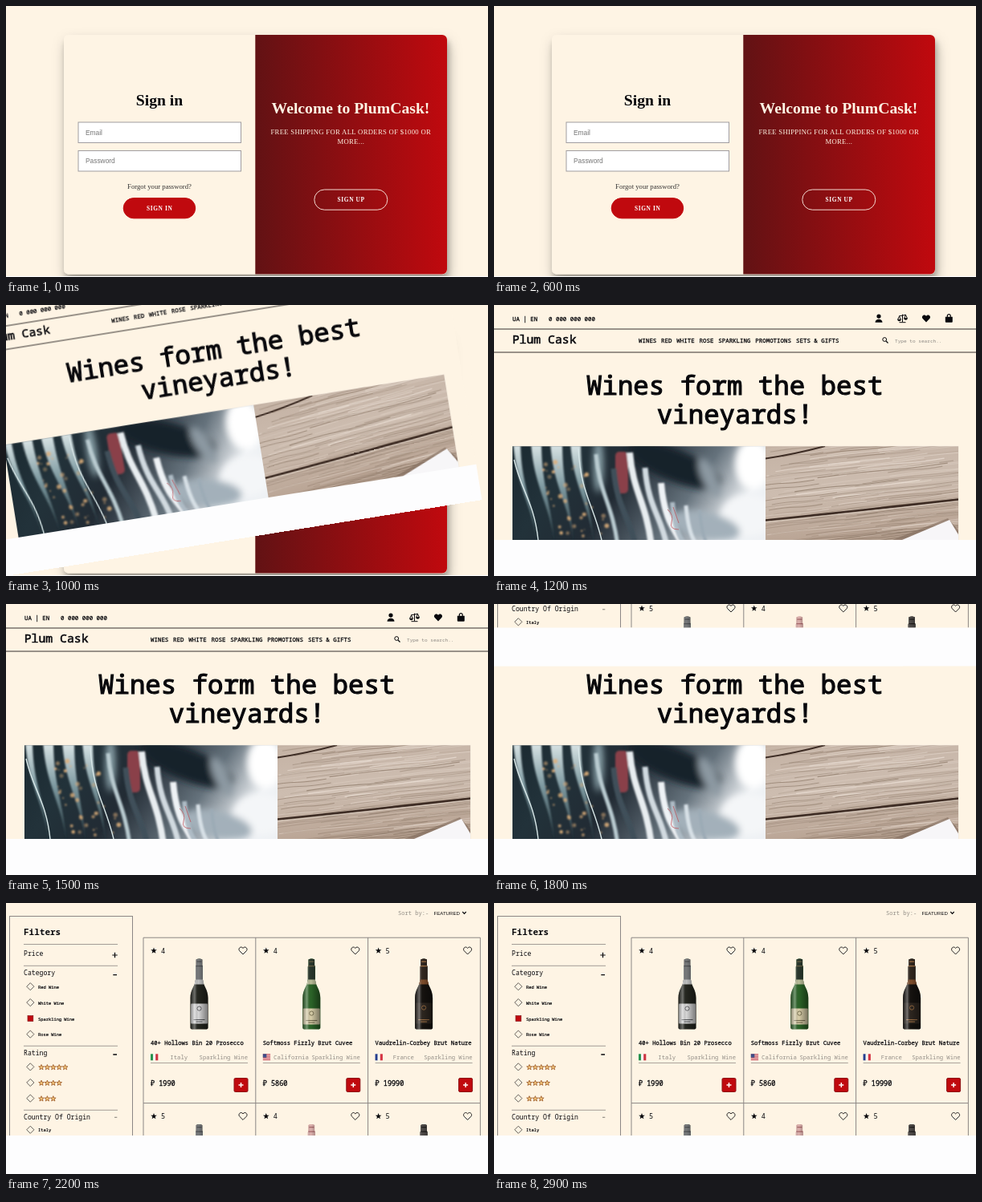
An HTML page for the animation above (3000 ms loop, 600 px wide and 338 px high).

```html
<!DOCTYPE html>
<html lang="en">
<head>
<meta charset="utf-8">
<title>Wine shop</title>
<style>
html, body { margin: 0; width: 100%; height: 100%; overflow: hidden; background: #fef4e4; }
svg { display: block; width: 100vw; height: 100vh; }
text { white-space: pre; }
.mono { font-family: "Noto Sans Mono", "DejaVu Sans Mono", monospace; }
.serif { font-family: "Liberation Serif", serif; }
.sans { font-family: "Liberation Sans", sans-serif; }
#home { transform-origin: 0 338px; animation: swing 3s step-end infinite; }
#shop { animation: drop 3s step-end infinite; }
/* Ease-out cubic, held at ten steps per second */
@keyframes swing {
  0% { transform: rotate(-90deg); }
  26.66% { transform: rotate(-58.6deg); }
  29.99% { transform: rotate(-26.74deg); }
  33.33% { transform: rotate(-9.1deg); }
  36.66% { transform: rotate(-1.7deg); }
  39.99%, 100% { transform: rotate(0deg); }
}
@keyframes drop {
  0% { transform: translateY(-340px); }
  59.99% { transform: translateY(-260.5px); }
  63.33% { transform: translateY(-124px); }
  66.66% { transform: translateY(-46px); }
  69.99% { transform: translateY(-11px); }
  73.33%, 100% { transform: translateY(0); }
}
</style>
</head>
<body>
<svg viewBox="0 0 600 338" preserveAspectRatio="none">
  <defs>
    <linearGradient id="wine"><stop stop-color="#621214"/><stop offset="1" stop-color="#c0090e"/></linearGradient>
    <linearGradient id="cellar" x2="1" y2=".25">
      <stop stop-color="#1b2a31"/><stop offset=".25" stop-color="#22323a"/><stop offset=".5" stop-color="#222b34"/>
      <stop offset=".78" stop-color="#65727c"/><stop offset="1" stop-color="#eef1f4"/>
    </linearGradient>
    <linearGradient id="glare" x2="0" y2="1">
      <stop stop-color="#dfe9ea"/><stop offset=".45" stop-color="#7e9aa1"/><stop offset="1" stop-color="#22343b"/>
    </linearGradient>
    <linearGradient id="wood" x2=".2" y2="1">
      <stop stop-color="#c4b2a4"/><stop offset=".5" stop-color="#cdbdb0"/><stop offset="1" stop-color="#b9a494"/>
    </linearGradient>
    <linearGradient id="glass">
      <stop stop-color="#000" stop-opacity=".4"/><stop offset=".25" stop-color="#fff" stop-opacity=".35"/>
      <stop offset=".45" stop-color="#000" stop-opacity="0"/><stop offset="1" stop-color="#000" stop-opacity=".45"/>
    </linearGradient>
    <filter id="soft"><feGaussianBlur stdDeviation="1.3"/></filter>
    <filter id="softer" x="-50%" y="-50%" width="200%" height="200%"><feGaussianBlur stdDeviation="4"/></filter>
    <filter id="shade" x="-10%" y="-10%" width="120%" height="125%">
      <feDropShadow dy="8" stdDeviation="8" flood-opacity=".25"/>
      <feDropShadow dy="6" stdDeviation="3" flood-opacity=".2"/>
    </filter>
    <clipPath id="cellarBox"><rect x="23" y="176.3" width="315" height="117"/></clipPath>
    <clipPath id="woodBox"><rect x="338" y="176.3" width="240" height="117"/></clipPath>
    <clipPath id="shopBox"><rect width="600" height="290"/></clipPath>
  </defs>
  <g id="login"></g>
  <g id="home"></g>
  <g id="shop"></g>
</svg>
<script>
const CREAM = '#fef4e4', RED = '#c0090e', INK = '#08080c', LINE = '#8b8785', BLANK = '#fdfdfe';

const text = (font, x, y, size, str, attrs = '') =>
  `<text class="${font}" x="${x}" y="${y}" font-size="${size}" ${attrs}>${str}</text>`;
const mono = (...args) => text('mono', ...args);
const serif = (...args) => text('serif', ...args);
// A thin outline gives the weight between regular and bold
const medium = (x, y, size, str, attrs = '') =>
  mono(x, y, size, str, `stroke="${INK}" stroke-width="${(size * .036).toFixed(2)}" ${attrs}`);
const rect = (x, y, w, h, fill, attrs = '') =>
  `<rect x="${x}" y="${y}" width="${w}" height="${h}" fill="${fill}" ${attrs}/>`;
const path = (d, attrs = '') => `<path d="${d}" ${attrs}/>`;
const stroke = (color, width = 1) => `fill="none" stroke="${color}" stroke-width="${width}"`;
const at = (x, y, inner) => `<g transform="translate(${x} ${y})">${inner}</g>`;
const times = (n, fn) => Array.from({ length: n }, (_, i) => fn(i)).join('');
const each = (list, fn) => list.map(fn).join('');
const middle = 'text-anchor="middle"';

function seeded(seed) {
  return () => (seed = (seed * 16807) % 2147483647) / 2147483647;
}

function star(x, y, r, attrs) {
  const points = times(10, i => {
    const a = i * Math.PI / 5, d = i % 2 ? r * .42 : r;
    return `${(x + d * Math.sin(a)).toFixed(2)},${(y - d * Math.cos(a)).toFixed(2)} `;
  });
  return `<polygon points="${points}" ${attrs}/>`;
}

const heart = (x, y, attrs) =>
  at(x, y, path('M0 4.7L-4.3.4C-6.3-2-3.8-5.2-1.2-4L0-2.9 1.2-4C3.8-5.2 6.3-2 4.3.4Z', attrs));

function login() {
  const field = (y, label) => rect(90, y, 202.5, 25.5, '#fff', 'stroke="#a09da0"') +
    text('sans', 99, y + 15.5, 8.4, label, 'fill="#757575"');
  const button = (x, y, w, label, fill, edge) =>
    rect(x, y, w, 25.2, fill, `rx="12.6" stroke="${edge}"`) +
    serif(x + w / 2 + .3, y + 15.2, 7.4, label, `${middle} font-weight="700" letter-spacing=".62" fill="#fff"`);
  const pitch = `${middle} letter-spacing=".31"`;
  return rect(0, 0, 600, 338, CREAM) +
    rect(72, 36, 477, 298.5, CREAM, 'rx="6" filter="url(#shade)"') +
    path('M310.3 36H543a6 6 0 0 1 6 6V328.5a6 6 0 0 1-6 6H310.3Z', 'fill="url(#wine)"') +
    serif(191, 124, 19.7, 'Sign in', `${middle} font-weight="700" fill="${INK}"`) +
    field(145, 'Email') + field(180.5, 'Password') +
    serif(191, 227.7, 8.68, 'Forgot your password?', `${middle} fill="#333"`) +
    button(146.2, 239.6, 89.5, 'SIGN IN', RED, RED) +
    `<g fill="${CREAM}">` +
    serif(429, 134, 19.7, 'Welcome to PlumCask!', `${middle} font-weight="700"`) +
    serif(429.3, 159.8, 8.69, 'FREE SHIPPING FOR ALL ORDERS OF $1000 OR', pitch) +
    serif(429.3, 172.2, 8.69, 'MORE...', pitch) + '</g>' +
    button(383.8, 229, 91, 'SIGN UP', 'none', '#f3d9d0') +
    rect(0, 337, 600, 1, BLANK);
}

function cellarPhoto() {
  const rnd = seeded(41);
  const blob = (x, y, rx, ry, fill, turn = 0) =>
    `<ellipse rx="${rx}" ry="${ry}" fill="${fill}" transform="translate(${x} ${y}) rotate(${turn})"/>`;
  const streak = (x, y, color, width) =>
    path(`M${x} ${y}C${x + 4} ${y + 50} ${x + 20} ${y + 60} ${x + 27} 300`, stroke(color, width));
  // Light between two bottle necks, narrowing towards the shoulders
  const gap = (x, width) =>
    path(`M${x} 170C${x + 3} 225 ${x + 22} 245 ${x + 29} 296C${x + 25} 245 ${x + width} 225 ${x + width} 170Z`, 'fill="url(#glare)"');
  return '<g clip-path="url(#cellarBox)">' + rect(23, 176, 315, 118, 'url(#cellar)') +
    '<g filter="url(#softer)">' +
    blob(225, 200, 62, 20, '#19232b', 22) + blob(268, 215, 9, 26, '#8d9aa3', -25) +
    blob(322, 198, 22, 32, '#fff') + blob(316, 262, 34, 26, '#f4f6f8') +
    blob(262, 275, 45, 17, '#a3b0ba', 12) + blob(130, 200, 6, 34, '#91a9b0') + '</g>' +
    '<g filter="url(#soft)">' + gap(24, 9) + gap(46, 13) + gap(70, 15) + gap(95, 13) +
    rect(151, 183, 16, 52, '#8a4148', 'rx="5"') +
    streak(127, 186, '#b9cbd0', 5) + streak(149, 204, '#3f505a', 7) + streak(169, 184, '#e8edf0', 8) +
    streak(188, 203, '#d1dae0', 7) + streak(208, 222, '#eef2f5', 8) + streak(222, 246, '#aebbc5', 6) +
    streak(239, 250, '#d7e0e6', 5) + streak(256, 256, '#9cabb6', 4) +
    times(38, () => {
      const y = 196 + rnd() * 94, x = 52 + (y - 196) * .35 + rnd() * 62;
      return `<circle cx="${x}" cy="${y}" r="${.8 + rnd() * 2.2}" fill="#dcae79" opacity="${.35 + rnd() * .6}"/>`;
    }) + '</g>' +
    path('M25 193C34 232 50 246 55 293M105 179C108 235 123 247 134 293', stroke('#d8e7e8', 1.4)) +
    path('M216 255q8 7 5 16t9 9M223 252l7 20', stroke('#bd4b52', .7)) + '</g>';
}

function woodPhoto() {
  const rnd = seeded(17), slope = -.115;
  const grain = times(150, () => {
    const x = 320 + rnd() * 180, w = 50 + rnd() * 150, y = 180 + rnd() * 145 + (x - 338) * slope;
    const color = rnd() > .42 ? '#84705f' : '#eee3d9';
    return path(`M${x} ${y}q${w * .3} ${w * .3 * slope - 1.5} ${w * .5} ${w * .5 * slope}t${w * .5} ${w * .5 * slope}`,
      stroke(color, .4 + rnd() * .9) + ` opacity="${.2 + rnd() * .5}"`);
  });
  return '<g clip-path="url(#woodBox)">' + rect(338, 176, 240, 118, 'url(#wood)') + grain +
    path('M338 191.5Q375 186 412 176', stroke('#3d2c24', 2)) +
    path('M338 268.5Q460 256 578 242.5', stroke('#3d2c24', 2.6)) +
    path('M338 270.8Q460 258.3 578 244.8', stroke('#e3d6ca', .9)) +
    path('M496 293L565 266 578 281V293Z', 'fill="#806b5c" opacity=".6"') +
    path('M508 293L567 268 579 288V294H508Z', 'fill="#f7f6f8"') + '</g>';
}

function home() {
  const nav = [[180, 'WINES'], [208, 'RED'], [227.3, 'WHITE'], [255.5, 'ROSE'], [279.3, 'SPARKLING'],
    [325.3, 'PROMOTIONS'], [376, 'SETS &amp; GIFTS']];
  const icons =
    at(479, 16.7, '<circle cy="-2.6" r="2.6"/>' + path('M-4.5 5C-4.5-.3 4.5-.3 4.5 5Z')) +
    at(508.5, 16.7, path('M0-5V4.5M-4 5H4M-4.5-2.8L4.5-4.5M-4-2.5L-6 1.5H-2ZM4-4L2 0H6Z', stroke(INK)) +
      path('M-6.2 1.5a2.2 2 0 0 0 4.4 0ZM1.8 0a2.2 2 0 0 0 4.4 0Z')) +
    heart(538, 16.7, '') +
    at(566.3, 16.7, path('M-4.5-2H4.5V4a1 1 0 0 1-1 1H-3.5a1 1 0 0 1-1-1Z') +
      path('M-2-.5V-3a2 2 0 0 1 4 0V-.5', stroke(INK, 1.2)));
  return rect(0, 0, 600, 338, CREAM) + `<g fill="${INK}">` +
    medium(23, 19.6, 7.44, 'UA | EN') + medium(68, 19.6, 7.44, '0 000 000 000') + icons +
    medium(22.7, 48, 14.8, 'Plum Cask') +
    each(nav, ([x, label]) => medium(x, 47.3, 7.44, label)) +
    path('M0 30H600M0 59H600', stroke('#34302f')) +
    '<circle cx="486.2" cy="43" r="2.4" ' + stroke(INK) + '/>' + path('M488 45L490.5 47.5', stroke(INK, 1.2)) +
    mono(499, 46.5, 6.1, 'Type to search..', 'fill="#8c8883"') +
    medium(299.7, 111.5, 32.4, 'Wines form the best', middle) +
    medium(300, 147.5, 32.4, 'vineyards!', middle) + '</g>' +
    rect(22.4, 175.8, 556.2, 118, '#efe7db') + cellarPhoto() + woodPhoto() +
    rect(0, 293, 600, 45, BLANK);
}

function bottle(x, y, { foil, body, label, collar, top, height, mark }) {
  const shape = 'M-3.8 1Q0-1 3.8 1V8L4.5 10V26C5 34 11 38 11 49V86Q11 88 8 88H-8Q-11 88-11 86V49C-11 38-5 34-4.5 26V10L-3.8 8Z';
  return at(x, y, path(shape, `fill="${body}"`) +
    path('M-3.8 1Q0-1 3.8 1V8L4.5 10V26L5.5 31H-5.5L-4.5 26V10L-3.8 8Z', `fill="${foil}"`) +
    path('M-3 3.5H3M-4 9H4', stroke(mark, 1.2)) +
    path('M-4.5 26H4.5L6 32H-6Z', `fill="${collar}"`) +
    rect(-10.5, top, 21, height, label, 'rx="1"') +
    path(`M-7 ${top + height - 5}H7M-4 ${top + height - 2.5}H4`, stroke(mark, 1)) +
    `<circle cy="${top + 6}" r="2.6" ${stroke(mark, .8)}/>` +
    path(shape, 'fill="url(#glass)"'));
}

function flag(x, y, code) {
  const bands = { it: ['#27934f', '#f5f5f2', '#cd3340'], fr: ['#233d8e', '#f5f5f2', '#d63443'] }[code];
  if (bands) return each(bands, (color, i) => rect(x + i * 3.1, y, 3.1, 8, color));
  return rect(x, y, 9.3, 8, '#f4e8e6') + times(4, i => rect(x, y + i * 2.2, 9.3, 1.2, '#c84955')) +
    rect(x, y, 4.5, 4.4, '#3d4d86');
}

const silver = { foil: '#77797b', body: '#24261f', label: '#d6d6d6', collar: '#bfc0c0', top: 56, height: 25, mark: '#4d4f52' };
const green = { foil: '#29372c', body: '#2c6528', label: '#d9cfaa', collar: '#b9bd98', top: 62, height: 20, mark: '#6a6245' };
const black = { foil: '#30261e', body: '#15120f', label: '#2c251f', collar: '#7d4c2b', top: 55, height: 26, mark: '#a57446' };
const pink = { ...green, foil: '#deb2ae', body: '#db9894', mark: '#a9686a' };
const dark = { ...black, foil: '#4d4947', mark: '#1f1c1b' };

const products = [
  { rate: 4, name: '40+ Hollows Bin 20 Prosecco', code: 'it', land: 'Italy', price: 1990, look: silver },
  { rate: 4, name: 'Softmoss Fizzly Brut Cuvee', code: 'us', land: 'California', price: 5860, look: green },
  { rate: 5, name: 'Vaudrelin-Corbey Brut Nature', code: 'fr', land: 'France', price: 19990, look: black },
  { rate: 5, look: silver }, { rate: 4, look: pink }, { rate: 5, look: dark }
];

function card(item, i) {
  const x = 171 + (i % 3) * 139.8, y = 43 + Math.floor(i / 3) * 206.5;
  const head = star(13, 16.5, 4, `fill="${INK}"`) + mono(22, 19.8, 8.6, item.rate) +
    heart(124, 16.3, stroke(INK, .9)) + bottle(69.5, 26.6, item.look);
  if (!item.name) return at(x, y, head);
  return at(x, y, head + medium(9, 134, 7.15, item.name) + flag(9, 145.3, item.code) +
    `<g fill="#928d86">` + mono(44.2, 151.7, 7.3, item.land, middle) +
    mono(130, 151.7, 7.2, 'Sparkling Wine', 'text-anchor="end"') + '</g>' +
    path('M9 156.5H130', stroke('#aaa49c')) +
    medium(9, 185, 8.5, `₽ ${item.price}`) +
    rect(113, 175.5, 17, 17, RED, 'rx="1.5" stroke="#8d1014"') +
    path('M121.5 181V187M118.5 184H124.5', stroke('#fff', 1.4)));
}

function filters() {
  const diamond = y => path(`M30.3 ${y - 4.6}l4.6 4.6-4.6 4.6-4.6-4.6Z`, stroke('#55504c', .9));
  const label = (y, str) => medium(40, y + 2.4, 5.4, str);
  const option = (y, str) => diamond(y) + label(y, str);
  const heading = (y, str) => mono(22, y, 8.15, str);
  return rect(4.5, 16.5, 153, 300, 'none', `stroke="${LINE}"`) +
    mono(22, 39.8, 11, 'Filters', 'font-weight="600"') +
    path('M22 51.5H139M22 78.3H139M22 178.3H139M22 258.3H139', stroke('#a39d96')) +
    heading(66, 'Price') + path('M132.3 65H138.7M135.5 61.8V68.2', stroke(INK, 1.2)) +
    heading(90, 'Category') + path('M133.3 89.7H138M133.3 189H138', stroke(INK, 1.3)) +
    option(104.2, 'Red Wine') + option(124.1, 'White Wine') +
    rect(27, 140.6, 6.8, 6.8, RED, 'stroke="#85161a" stroke-width=".7"') + label(144.1, 'Sparkling Wine') +
    option(163.6, 'Rose Wine') + heading(189.7, 'Rating') +
    times(3, row => diamond(204.4 + row * 19.6) +
      times(5 - row, i => star(44 + i * 7.4, 205 + row * 19.6, 3.5, 'fill="#f4c77d" stroke="#9a5622" stroke-width=".8"'))) +
    heading(269.8, 'Country Of Origin') + path('M135 267.3H138.3', stroke('#77716b', .9)) +
    option(282.8, 'Italy');
}

function shop() {
  return rect(0, 0, 600, 338, CREAM) + `<g clip-path="url(#shopBox)" fill="${INK}">` + filters() +
    mono(488, 14.6, 7.1, 'Sort by:-', 'fill="#928d86"') +
    text('sans', 532.5, 14.6, 6.1, 'FEATURED') + path('M568.3 11L570.5 13.3 572.7 11', stroke(INK, 1.2)) +
    path('M171 300V43.2H590.4V300M310.8 43V300M450.6 43V300M171 249.6H590', stroke(LINE)) +
    each(products, card) + '</g>' + rect(0, 290, 600, 48, BLANK);
}

for (const page of [login, home, shop]) document.getElementById(page.name).innerHTML = page();
</script>
</body>
</html>
```
